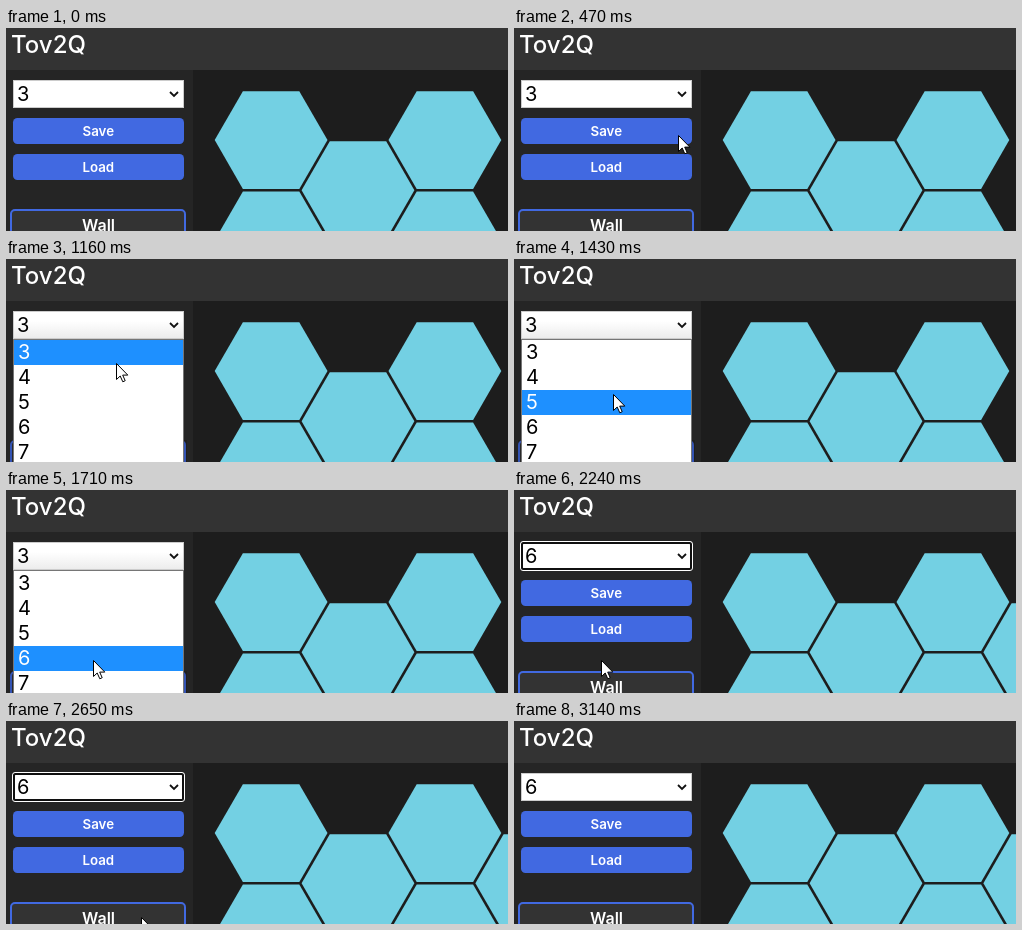
An HTML page that plays this animation: 502x203 px, repeating every 3210 ms.

```html
<!DOCTYPE html>
<html lang="en">
<head>
<meta charset="utf-8">
<title>Tov2Q</title>
<style>
html, body { margin: 0; width: 100%; height: 100%; overflow: hidden; background: #1d1d1d; }
svg { display: block; font-family: Inter, "Open Sans", sans-serif; font-weight: 500; }
.digit { font-size: 20px; font-weight: 400; }
.label { font-size: 13.3px; font-weight: 600; fill: #fff; text-anchor: middle; }
</style>
</head>
<body>
<svg width="502" height="203" viewBox="0 0 502 203">
  <defs>
    <linearGradient id="shade" x1="0" y1="0" x2="0" y2="1">
      <stop offset="0.35" stop-color="#fff"/>
      <stop offset="1" stop-color="#ececec"/>
    </linearGradient>
  </defs>
  <rect width="502" height="203" fill="#1d1d1d"/>
  <g id="grid" fill="#73d0e3"></g>
  <rect y="42" width="187" height="161" fill="#252525"/>
  <rect width="502" height="42" fill="#333"/>
  <text x="5" y="25" font-size="24" fill="#fff">Tov2Q</text>

  <g id="buttons"></g>
  <rect x="5" y="182" width="174" height="40" rx="4" fill="#333" stroke="#4169e1" stroke-width="2"/>
  <text class="label" x="92.5" y="203" style="font-size:16px">Wall</text>

  <rect id="box" x="7.5" y="52.5" width="170" height="27" stroke="#ccc"/>
  <g id="ring" fill="none">
    <rect x="6.5" y="51.5" width="172" height="29" rx="2.5" stroke="#fff"/>
    <rect x="8" y="53" width="169" height="26" rx="1.5" stroke="#101010" stroke-width="2"/>
  </g>
  <text id="value" class="digit" x="11" y="73"></text>
  <path d="M164 64l4 4l4-4" fill="none" stroke="#111" stroke-width="1.8"/>

  <g id="list">
    <path d="M4 181h3v22h-3zM178 181h3v22h-3z" fill="#000" opacity="0.2"/>
    <rect x="7.5" y="80.5" width="170" height="130" fill="#fff" stroke="#767676"/>
    <rect id="mark" x="8" width="169" height="25" fill="#1e90ff"/>
    <g id="options"></g>
  </g>
  <path id="cursor" d="M.5 .5V16.5L4.2 13L6.8 18.8L9.2 17.7L6.7 12.1H11.8Z" fill="#fff" stroke="#000" stroke-linejoin="round"/>
</svg>
<script>
const LOOP = 3210, ENTER = 270, OPEN = 890, PICK = 2240, BLUR = 3140;
const STEP = 66.5; // the pointer is redrawn about 15 times a second
const ROW_TOP = 81, ROW = 25, FIRST = 3;
const $ = id => document.getElementById(id);

const easeIn = u => u * u;
const easeOut = u => 1 - (1 - u) ** 2.43;
const easeInOut = u => u * u * (3 - 2 * u);

const origin = { x: 293, y: 197 };
const moves = [
  { from: ENTER, to: 760, x: 114, y: 72, ease: easeOut },
  { from: OPEN, to: 1160, x: 110, y: 104, ease: easeIn },
  { from: 1160, to: 1710, x: 87, y: 170, ease: easeInOut },
  { from: 2310, to: 2720, x: 160, y: 210, ease: easeIn }
];

function pointer(t) {
  let { x, y } = origin;
  for (const m of moves) {
    if (t < m.from) break;
    const held = Math.floor((t - m.from) / STEP) * STEP;
    const u = t >= m.to ? 1 : m.ease(held / (m.to - m.from));
    x += (m.x - x) * u;
    y += (m.y - y) * u;
  }
  return { x: Math.round(x), y: Math.round(y) };
}

function add(parent, tag, attrs, text = "") {
  const el = document.createElementNS("http://www.w3.org/2000/svg", tag);
  for (const k in attrs) el.setAttribute(k, attrs[k]);
  el.textContent = text;
  parent.appendChild(el);
  return el;
}

function hexPoints(cx, cy, r) {
  return Array.from({ length: 6 }, (_, i) => {
    const a = i * Math.PI / 3;
    return (cx + r * Math.cos(a)).toFixed(2) + "," + (cy + r * Math.sin(a)).toFixed(2);
  }).join(" ");
}

["Save", "Load"].forEach((name, i) => {
  const y = 90 + 36 * i;
  add($("buttons"), "rect", { x: 7, y, width: 171, height: 26, rx: 4.5, fill: "#4169e1" });
  add($("buttons"), "text", { class: "label", x: 92.3, y: y + 18 }, name);
});

const columns = [0, 1, 2, 3].map(col => {
  const g = add($("grid"), "g", {});
  for (let row = 0; row < 2; row++) {
    const cy = 112.1 + 100.2 * (row + (col % 2) / 2);
    add(g, "polygon", { points: hexPoints(265.1 + 86.9 * col, cy, 56.4) });
  }
  return g;
});

const options = Array.from({ length: 5 }, (_, i) =>
  add($("options"), "text", { class: "digit", x: 12, y: ROW_TOP + 19 + ROW * i }, FIRST + i));

const show = (el, on) => el.setAttribute("visibility", on ? "visible" : "hidden");

function draw(t) {
  const open = t >= OPEN && t < PICK;
  const picked = t >= PICK;
  const { x, y } = pointer(t);

  show($("cursor"), t >= ENTER);
  $("cursor").setAttribute("transform", `translate(${x} ${y})`);

  show($("list"), open);
  show($("ring"), picked && t < BLUR);
  show(columns[3], picked);
  $("box").setAttribute("fill", open ? "url(#shade)" : "#fff");
  $("value").textContent = picked ? 6 : FIRST;

  const active = Math.max(0, Math.floor((y - ROW_TOP) / ROW));
  $("mark").setAttribute("y", ROW_TOP + ROW * active);
  options.forEach((el, i) => el.setAttribute("fill", i === active ? "#fff" : "#000"));
}

const start = performance.now();
function tick() {
  draw((performance.now() - start) % LOOP);
  requestAnimationFrame(tick);
}
draw(0);
requestAnimationFrame(tick);
</script>
</body>
</html>
```
